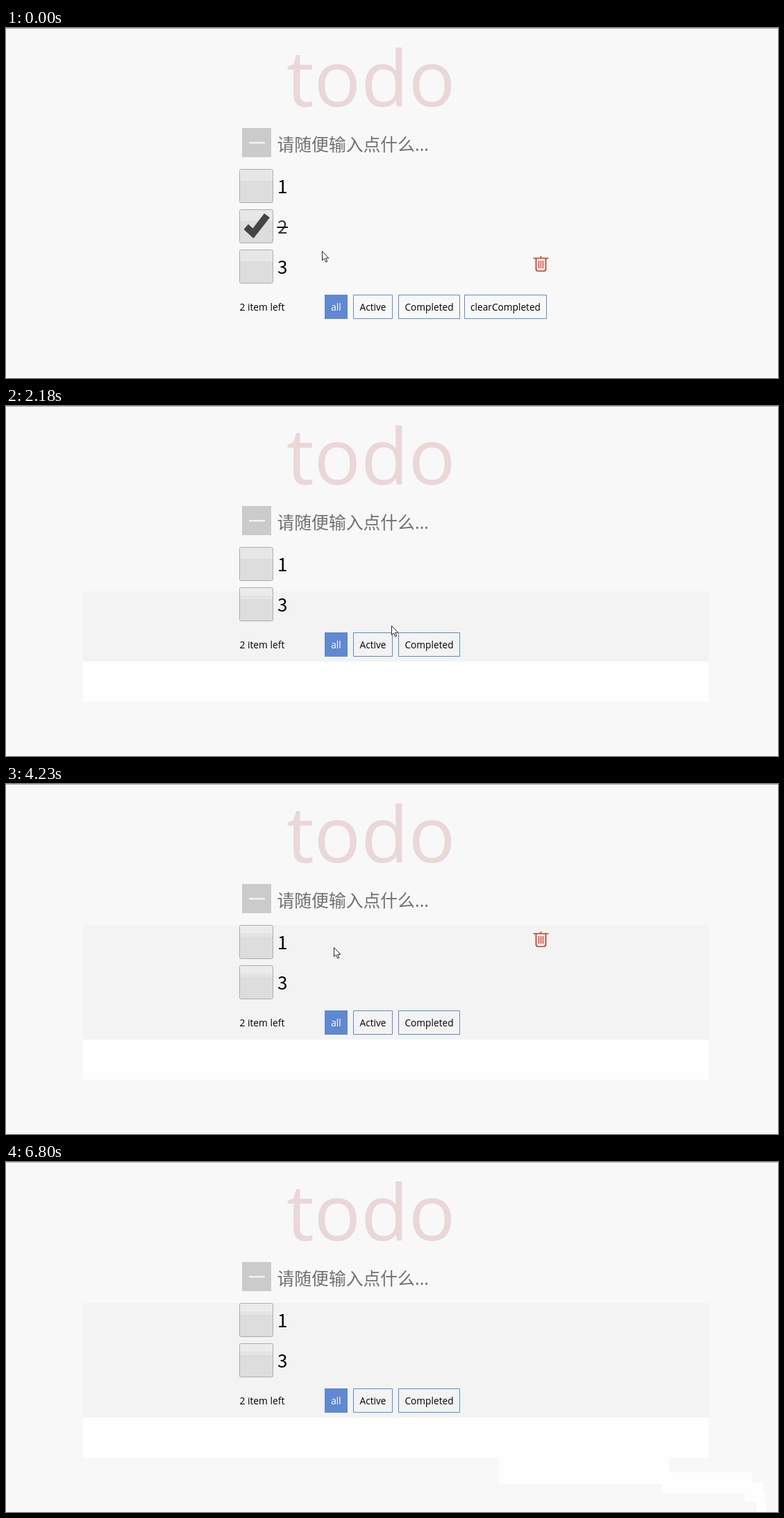
An HTML page with a canvas that plays this animation: 1112x504 px, repeating every 7350 ms.

```html
<!DOCTYPE html>
<html lang="zh">
<head>
<meta charset="utf-8">
<style>
  html, body { margin: 0; width: 100%; height: 100%; overflow: hidden; background: #f8f8f8; }
  canvas { display: block; }
</style>
</head>
<body>
<canvas id="stage" width="1112" height="504"></canvas>
<script>
const c = document.getElementById('stage').getContext('2d');
const LOOP = 7350, TICK = 136;
const BLUE = '#5f89d0', GRAY = '#f3f3f3', WHITE = '#fefefe';
const SANS = '"Open Sans", "Noto Sans", sans-serif';
const CJK = '"Noto Sans CJK SC", "Noto Sans CJK", "Noto Sans CJK JP", sans-serif';

// Ticks at which the list changes
const REMOVE = 13, ACTIVE = 19, COMPLETED = 25, ALL = 31;
const ROW = 58, LIST_TOP = 203;

// Pointer key points: tick, x, y
const path = [
  [0, 455, 321], [1, 589, 350], [2, 650, 372], [4, 699, 340], [5, 707, 307], [6, 745, 296],
  [8, 761, 293], [11, 770, 282], [14, 770, 282], [16, 555, 316], [18, 535, 341], [20, 535, 341],
  [22, 620, 339], [26, 620, 339], [29, 472, 235], [31, 472, 235], [37, 385, 229], [38, 378, 248],
  [41, 373, 266], [44, 710, 400], [45, 945, 447], [46, 1064, 461], [47, 1081, 473], [50, 1087, 520]
];

const buttons = [['all', 459, 33], ['Active', 500, 57], ['Completed', 565, 89], ['clearCompleted', 660, 119]];

const arrow = new Path2D('M.5.5v13.2l3-2.8 2.3 5.2 2-.9-2.2-4.9h4.2z');
const check = new Path2D('M6.5 29L13 21.500l6.500 6L36 6l8 6-23.500 30z');
const bin = new Path2D('M.5 3.500h22M11.500.5v3M4.500 3.500V19q0 3 3 3h8q3 0 3-3V3.500');
const ribs = new Path2D('M8.500 7v11M11.500 7v11M14.500 7v11');

function pointer(tick) {
  const i = Math.max(1, path.findIndex(p => p[0] >= tick));
  const [t0, x0, y0] = path[i - 1], [t1, x1, y1] = path[i];
  const f = Math.min(1, (tick - t0) / (t1 - t0));
  return [Math.round(x0 + (x1 - x0) * f), Math.round(y0 + (y1 - y0) * f)];
}

function itemsAt(tick) {
  if (tick < REMOVE) return ['1', '2', '3'];
  return tick >= COMPLETED && tick < ALL ? [] : ['1', '3'];
}

function hoverRow(tick) {
  const [x, y] = pointer(tick);
  const row = Math.floor((y - LIST_TOP) / ROW);
  const inside = x >= 336 && x <= 782 && (y - LIST_TOP) % ROW < 46;
  return inside && row < itemsAt(tick).length ? row : -1;
}

function box(color, x, y, w, h) {
  c.fillStyle = color;
  c.fillRect(x, y, w, h);
}

function outline(color, x, y, w, h, r = 0) {
  c.beginPath();
  c.roundRect(x + .5, y + .5, w - 1, h - 1, r);
  strokeShape(color, 1);
}

function strokeShape(color, width, shape) {
  c.strokeStyle = color;
  c.lineWidth = width;
  shape ? c.stroke(shape) : c.stroke();
}

function text(str, x, y, size, color, family = SANS, align = 'left') {
  c.font = `${size}px ${family}`;
  c.fillStyle = color;
  c.textAlign = align;
  c.fillText(str, x, y);
}

function at(x, y, paint) {
  c.save();
  c.translate(x, y);
  paint();
  c.restore();
}

// Each step repaints the area spanned by the moving pointer and bin
function trail(tick) {
  for (let k = 1; k <= tick; k++) {
    const [a, b] = [pointer(k - 1), pointer(k)];
    if (a[0] === b[0] && a[1] === b[1]) continue;
    const areas = [a, b].map(([x, y]) => [x, y, x + 10, y + 16]);
    const rows = [hoverRow(k - 1), hoverRow(k)];
    if (rows[0] !== rows[1])
      for (const r of rows) if (r >= 0) areas.push([759, 270 + r * ROW - ROW, 782, 293 + r * ROW - ROW]);
    const edge = (i, pick) => pick(...areas.map(area => area[i]));
    const x = edge(0, Math.min), y = edge(1, Math.min);
    box(k < REMOVE ? GRAY : WHITE, x, y, edge(2, Math.max) - x, edge(3, Math.max) - y);
  }
}

function checkbox(y, checked, shaded, lit) {
  const [top, mid, low] = lit ? ['#f1f1f1', '#e7e7e7', '#dfdfdf']
    : [shaded ? '#ebebeb' : '#e7e7e7', shaded ? '#e4e4e4' : '#e7e7e7', '#dddddd'];
  const split = lit ? 9 : 12;
  at(336, y, () => {
    box(low, 1, 1, 47, 47);
    box(mid, 1, 1, 47, split + 4);
    box(top, 1, 1, 47, split - 1);
    outline(lit ? '#969696' : '#adadad', 0, 0, 49, 49, 2);
    if (checked) {
      c.fillStyle = '#444';
      c.fill(check);
    }
  });
}

function footer(y, selected, count) {
  text('2 item left', 336.5, y + 23, 13.8, '#000');
  buttons.slice(0, count).forEach(([label, x, w], i) => {
    const on = i === selected;
    if (on) box(BLUE, x, y, w, 35);
    outline(BLUE, x, y, w, 35);
    text(label, x + w / 2, y + 23, 13.7, on ? '#fff' : '#000', SANS, 'center');
  });
}

function draw(tick) {
  const [px, py] = pointer(tick);
  const items = itemsAt(tick), hovered = hoverRow(tick);
  const removed = tick >= REMOVE;
  const band = tick < COMPLETED ? 267 : LIST_TOP;
  const footerY = 210 + items.length * ROW;

  box('#f8f8f8', 0, 0, 1112, 504);
  trail(tick);
  if (removed) {
    box(WHITE, 111, band, 901, 426 - band);
    box(GRAY, 111, band, 901, footerY + 42 - band);
  }
  box('#ababab', 0, 0, 1112, 1);

  text('todo', 404, 113, 112, '#ead7d7');
  box('#cbcbcb', 340, 144, 42, 42);
  box('#f2f2f2', 350, 164, 23, 2.5);
  text('请随便输入点什么', 390.5, 177, 24.8, '#707070', CJK);
  text('...', 589, 177, 25, '#707070');

  items.forEach((label, i) => {
    const y = LIST_TOP + i * ROW, done = label === '2';
    checkbox(y, done, removed && y + 10 > band, i === hovered && px <= 385);
    text(label, 391, y + 35, 26, done ? '#333' : '#000', CJK);
    if (done) box('#111', 390.5, y + 25, 15.5, 2);
    if (i === hovered) at(759, y + 9, () => {
      strokeShape('#d7341f', 1.7, bin);
      strokeShape('#d7341f', 1.3, ribs);
    });
  });

  const selected = !items.length ? 2 : tick >= ACTIVE && tick < COMPLETED ? 1 : 0;
  footer(footerY, selected, removed ? 3 : 4);

  at(px, py, () => {
    c.fillStyle = '#fff';
    c.fill(arrow);
    strokeShape('#26262e', 1, arrow);
  });
}

const start = performance.now();
function frame() {
  const t = (performance.now() - start) % LOOP;
  draw(Math.min(50, Math.floor((t + 30) / TICK)));
  requestAnimationFrame(frame);
}
frame();
</script>
</body>
</html>
```
